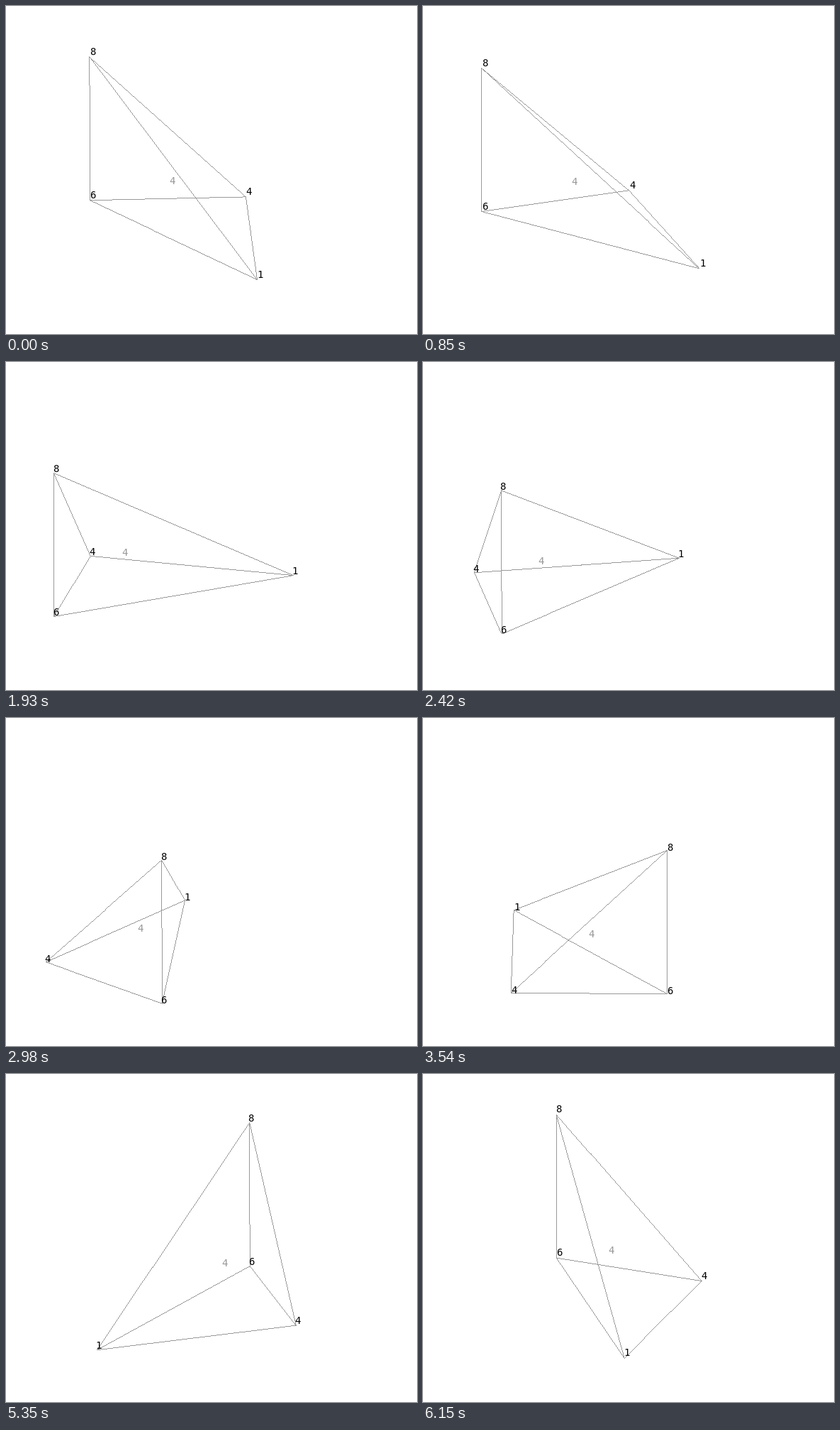
Write an HTML page with a canvas that moves like this. It is 580 px wide and 462 px high and loops after 7550 ms.

```html
<!DOCTYPE html>
<html lang="en">
<head>
<meta charset="utf-8">
<title>Rotating tetrahedron</title>
<style>
html, body { margin: 0; width: 100%; height: 100%; overflow: hidden; background: #fff; }
canvas { display: block; }
</style>
</head>
<body>
<canvas id="stage" width="580" height="462"></canvas>
<script>
const ctx = document.getElementById('stage').getContext('2d');
const LOOP = 7550, RAD = Math.PI / 180;
const CX = 236.4, CY = 329.6, RX = 183.7, RY = 73, HEIGHT = 202;
const GRAY = '#999';

// Turn angle in degrees at times in ms
const KEYS = [
  [0, 230], [230, 230], [1010, 206.7], [1450, 178.4], [1770, 164],
  [2420, 133], [2540, 126.1], [3540, 53.9], [4070, 19.4], [4350, 7.6],
  [4830, -40.6], [5150, -40.6], [5350, -54.1], [5910, -88], [6150, -105.1],
  [LOOP, -105.1]
];

const slope = i => (KEYS[i + 1][1] - KEYS[i][1]) / (KEYS[i + 1][0] - KEYS[i][0]);

function tangent(i) {
  if (i === 0 || i === KEYS.length - 1) return 0;
  const a = slope(i - 1), b = slope(i);
  return a * b > 0 ? 2 * a * b / (a + b) : 0;
}

// Monotone cubic through the keys
function angleAt(t) {
  let i = 0;
  while (i < KEYS.length - 2 && t >= KEYS[i + 1][0]) i++;
  const [t0, a0] = KEYS[i], [t1, a1] = KEYS[i + 1];
  const d = t1 - t0, u = (t - t0) / d, v = 1 - u;
  return a0 * v * v * (1 + 2 * u) + a1 * u * u * (3 - 2 * u)
    + d * u * v * (tangent(i) * v - tangent(i + 1) * u);
}

// The motion advances in 40 ms steps that drift slightly
function stepTime(t) {
  const phase = 10 * Math.min(3, Math.floor((t + 1400) / 1700));
  return Math.max(0, Math.floor((t - phase) / 40) * 40 + phase);
}

// One-pixel line without smoothing
function line([x0, y0], [x1, y1]) {
  const dx = x1 - x0, dy = y1 - y0;
  const n = Math.ceil(Math.max(Math.abs(dx), Math.abs(dy), 1));
  for (let i = 0; i <= n; i++) {
    ctx.fillRect(Math.floor(x0 + dx * i / n), Math.floor(y0 + dy * i / n), 1, 1);
  }
}

function label(text, [x, y], dx, dy) {
  ctx.fillText(text, Math.round(x + dx - 4.2), Math.round(y + dy + 5.1));
}

function draw(t) {
  const deg = angleAt(stepTime(t)), a = deg * RAD;
  const onBase = turn => [CX + RX * Math.cos(a + turn), CY + RY * Math.sin(a + turn)];
  const foot = onBase(0);
  const top = [foot[0] - 0.4, foot[1] - HEIGHT];
  const side = onBase(2 * Math.asin(0.6));
  const far = onBase(Math.PI);
  const points = [top, foot, side, far];

  ctx.fillStyle = '#fff';
  ctx.fillRect(0, 0, 580, 462);

  ctx.fillStyle = GRAY;
  points.forEach((p, i) => points.slice(i + 1).forEach(q => line(p, q)));

  ctx.font = '14px "DejaVu Sans Mono", monospace';
  const mid = [0, 1].map(k => points.reduce((sum, p) => sum + p[k], 0) / 4);
  label('4', mid, 3.1, -4.5);

  const dx = 4 + 1.3 * Math.cos(2 * (deg - 35) * RAD);
  const dy = -6.4 + 1.7 * Math.sin((deg + 40) * RAD);
  ctx.fillStyle = '#000';
  ['8', '6', '4', '1'].forEach((text, i) => label(text, points[i], dx, dy));
}

const start = performance.now();
function frame() {
  draw((performance.now() - start) % LOOP);
  requestAnimationFrame(frame);
}
frame();
</script>
</body>
</html>
```
